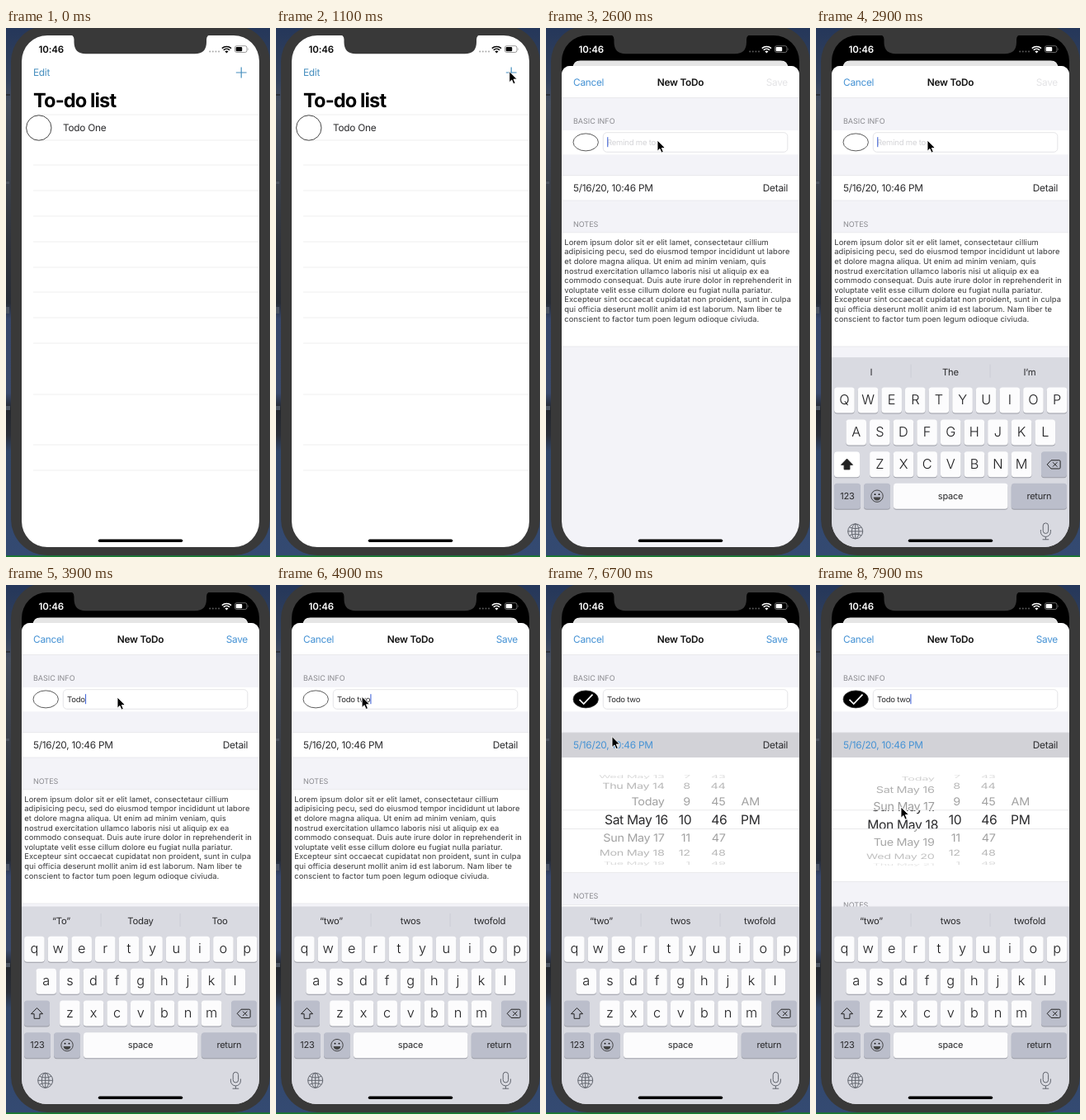
An HTML page that plays this animation: 320 by 641 pixels, repeating every 8000 ms.

```html
<!DOCTYPE html>
<html lang="en">
<head>
<meta charset="utf-8">
<title>To-do list</title>
<style>
html, body { margin: 0; width: 100%; height: 100%; overflow: hidden; background: #2c3c5c; }
svg { display: block; width: 100vw; height: 100vh; }
text { font-family: Inter, "Liberation Sans", sans-serif; white-space: pre; text-rendering: geometricPrecision; }
</style>
</head>
<body>
<svg id="stage" viewBox="0 0 320 641" xmlns="http://www.w3.org/2000/svg"></svg>
<script>
const BLUE = '#4592d4', INK = '#2a2a2c';
const $ = id => document.getElementById(id);
const clamp = v => Math.max(0, Math.min(1, v));
const mix = (a, b, p) => a + (b - a) * p;
const easeOut = p => 1 - (1 - clamp(p)) ** 3;
const smooth = p => (p = clamp(p)) * p * (3 - 2 * p);
const rgb = (a, b, p) => `rgb(${a.map((v, i) => Math.round(mix(v, b[i], p)))})`;

// y is the middle of the capitals
const text = (x, y, str, { size = 11.83, fill = INK, weight = 400, anchor = 'start', track = -.022, id = '' } = {}) =>
  `<text ${id && `id="${id}"`} x="${x}" y="${y + size * .36}" font-size="${size}" font-weight="${weight}"
   letter-spacing="${track * size}" text-anchor="${anchor}" ${fill ? `fill="${fill}"` : ''}>${str}</text>`;
const rect = (x, y, w, h, fill, more = '') =>
  `<rect x="${x}" y="${y}" width="${w}" height="${h}" fill="${fill}" ${more}/>`;
const path = (d, stroke, width, more = '') =>
  `<path d="${d}" fill="none" stroke="${stroke}" stroke-width="${width}" ${more}/>`;
const hair = (x, y, fill = '#e6e6ea') => rect(x, y - .4, 307 - x, .8, fill);

const backdrop = () => {
  const stops = ['0 #25375a', '.1 #33425c', '.14 #454e5e', '.3 #3a3f49', '.42 #2e323b', '.52 #272c36',
    '.55 #36466a', '.69 #3a4a6c', '.72 #23262c', '.77 #2a2e37', '.8 #314668', '1 #344a72'];
  return `<defs><linearGradient id="sky" x2="0" y2="1">${stops.map(s => s.split(' '))
    .map(([o, c]) => `<stop offset="${o}" stop-color="${c}"/>`).join('')}</linearGradient>
    <clipPath id="screen"><rect x="19" y="9" width="288" height="620" rx="31"/></clipPath>
    <clipPath id="slot"><rect x="19" y="273" width="288" height="22.5"/></clipPath>
    <clipPath id="offSlot"><path d="M19 209h288v64H19z M19 295.5h288v64H19z"/></clipPath>
    <clipPath id="drawer"><rect id="drawerBox" x="19" y="209" width="288" height="0"/></clipPath></defs>` +
    rect(0, 0, 320, 641, 'url(#sky)') + rect(0, 80, 5, 2, '#2c3038') + rect(0, 186, 4, 3, '#4d535f') +
    rect(0, 338, 4, 8, '#4b5362') + rect(0, 458, 5, 5, '#4d5562') +
    rect(6, -3, 314, 642, '#393939', 'rx="44"') + rect(0, 639.2, 320, 1.8, '#1a7a30');
};

const listPage = () => {
  const rows = [105, 136, 166, 197, 228, 259, 290, 320, 351, 382, 444, 505, 536];
  return `<g id="card"><path id="cardShape" fill="#fff"/>
    <g id="tint">${text(33, 54, 'Edit', { fill: '' })}
    <path d="M278.8 54h12.8M285.2 47.6v12.8" stroke-width="1.2"/></g>
    ${text(33, 87, 'To-do list', { size: 23.65, weight: 700, fill: '#000', track: -.038 })}
    ${rows.map(y => hair(33, y, '#ebebeb')).join('')}
    <circle cx="39.8" cy="121" r="15.2" fill="#fff" stroke="#333" stroke-width=".9"/>
    ${text(69, 120.8, 'Todo One')}
    <rect id="shade" x="19" y="9" width="288" height="620" rx="10" fill="#000" opacity="0"/></g>`;
};

const notes = [
  'Lorem ipsum dolor sit er elit lamet, consectetaur cillium',
  'adipisicing pecu, sed do eiusmod tempor incididunt ut labore',
  'et dolore magna aliqua. Ut enim ad minim veniam, quis',
  'nostrud exercitation ullamco laboris nisi ut aliquip ex ea',
  'commodo consequat. Duis aute irure dolor in reprehenderit in',
  'voluptate velit esse cillum dolore eu fugiat nulla pariatur.',
  'Excepteur sint occaecat cupidatat non proident, sunt in culpa',
  'qui officia deserunt mollit anim id est laborum. Nam liber te',
  'conscient to factor tum poen legum odioque civiuda.'];

const section = (y, label) => text(33, y, label, { size: 9.04, fill: '#8a8a8f', track: -.005 });

const sheet = () => `<g id="sheet">
  <path id="sheetBody" d="M19 56a10 10 0 0 1 10-10h268a10 10 0 0 1 10 10v583H19z"/>
  <path d="M19 84.5V56a10 10 0 0 1 10-10h268a10 10 0 0 1 10 10v28.5z" fill="#fff"/>${hair(19, 84.6)}
  ${text(33, 65.3, 'Cancel', { fill: BLUE })}
  ${text(163, 65.3, 'New ToDo', { weight: 600, anchor: 'middle', fill: '#111' })}
  ${text(293, 65.3, 'Save', { anchor: 'end', id: 'save' })}
  ${section(113, 'BASIC INFO')}
  ${rect(19, 124, 288, 29.3, '#fff')}
  <rect x="69.3" y="126.7" width="223.5" height="23.6" rx="4.5" fill="#fff" stroke="#dedee1" stroke-width=".8"/>
  <ellipse id="toggle" cx="48.2" cy="138.4" rx="15.2" ry="10.5" stroke="#333" stroke-width=".8"/>
  <path id="tick" d="M40.5 138.8L45.7 144L56.5 132.6" fill="none" stroke="#fff" stroke-width="1.7"/>
  ${text(74, 138.4, '', { size: 9.5, id: 'entry' })}
  <rect id="caret" y="132.2" width="1.1" height="12" fill="#4668d8"/>
  <rect id="dateRow" x="19" y="178.7" width="288" height="30.3"/>${hair(19, 178.7)}
  ${text(33, 194, '5/16/20, 10:46 PM', { id: 'date' })}
  ${text(293, 194, 'Detail', { anchor: 'end' })}
  <g clip-path="url(#drawer)">${rect(19, 209, 288, 151, '#fff')}<g id="wheels"></g></g>
  <g id="below">${hair(19, 209)}${section(237.5, 'NOTES')}
    ${rect(19, 247.8, 288, 138, '#fff')}${hair(19, 247.8)}${hair(19, 386)}
    ${notes.map((s, i) => text(22.3, 259.4 + i * 11.61, s, { size: 9.4, fill: '#38383a', track: .006 })).join('')}
  </g></g>`;

const key = (x, y, w, fill = '#fcfcfd') =>
  rect(x, y + 1, w, 31, '#9a9ca5', 'rx="3.6"') + rect(x, y, w, 31, fill, 'rx="3.6"');

const keyboard = () => {
  const GREY = '#bbbecb';
  const rows = [['qwertyuiop', 34.4, 425.8], ['asdfghjkl', 48.7, 464.8], ['zxcvbnm', 77.4, 503.6]];
  const letters = rows.map(([chars, x0, y]) => [...chars].map((c, i) => {
    const x = x0 + i * 28.63;
    return key(x - 12.3, y, 24.6) +
      text(x, y + 14.8, c, { size: 16.3, weight: 300, anchor: 'middle', fill: '#1c1c1e', track: 0 });
  }).join('')).join('');
  const label = (x, s, size = 11) => text(x, 557.5, s, { size, anchor: 'middle' });
  return `<g id="keyboard">${rect(19, 389.5, 288, 245, '#d9dae1')}
    ${[0, 1, 2].map(i => text(67 + i * 96, 407, '', { size: 11.3, anchor: 'middle', id: 'hint' + i })).join('')}
    ${rect(114.7, 398, .7, 16, '#c6c8cf')}${rect(210.7, 398, .7, 16, '#c6c8cf')}
    <g id="letters">${letters}</g>
    ${key(22, 503.6, 31, GREY)}<rect id="shiftOn" x="22" y="503.6" width="31" height="31" rx="3.6" fill="#fff"/>
    <path id="shift" d="M37.5 512.5l7 7.2h-3.6v5.6h-6.8v-5.6h-3.6z" stroke="#222" stroke-width="1" stroke-linejoin="round"/>
    ${key(273, 503.6, 31, GREY)}
    ${path('M285 514.2h9.8q1.3 0 1.3 1.3v7.6q0 1.3-1.3 1.3h-9.8l-4.8-5.1zM287 516.6l5.4 5.4M292.4 516.6l-5.4 5.4', '#222', 1)}
    ${key(22, 542.2, 32, GREY)}${label(38, '123')}
    ${key(58, 542.2, 32, GREY)}<circle cx="74" cy="557.6" r="7.2" fill="none" stroke="#333" stroke-width=".9"/>
    <circle cx="71.5" cy="555.6" r=".9"/><circle cx="76.5" cy="555.6" r=".9"/>
    <path d="M69.6 559h8.8q-.6 4-4.4 4t-4.4-4z" fill="#444"/>
    ${key(94, 542.2, 138.5)}${label(163, 'space')}
    ${key(236.8, 542.2, 67.2, GREY)}${label(270.4, 'return')}
    <g fill="none" stroke="#60646d" stroke-width="1"><circle cx="47.7" cy="600.3" r="9"/>
    <ellipse cx="47.7" cy="600.3" rx="4.3" ry="9"/>
    <path d="M38.7 600.3h18M47.7 591.3v18M40.5 595.3q7.2 3.4 14.4 0M40.5 605.3q7.2-3.4 14.4 0"/>
    <rect x="275.2" y="590.3" width="6.4" height="12.6" rx="3.2"/>
    <path d="M272.4 598.5v2.4a6 6 0 0 0 12 0v-2.4M278.4 607v3.2M274.6 610.2h7.6"/></g></g>`;
};

const statusBar = () => `<g id="status">
  ${text(54.8, 25.6, '10:46', { size: 11.5, weight: 600, anchor: 'middle', fill: '', track: -.012 })}
  <g opacity=".35">${[247.2, 250.8, 254.4, 258].map(x => `<circle cx="${x}" cy="28.6" r="1"/>`).join('')}</g>
  <path d="M267.4 30.6l-2.1-2.3a3.2 3.2 0 0 1 4.2 0z"/>
  <g fill="none" stroke-width="1.5" class="lines"><path d="M263.7 26.7a5.4 5.4 0 0 1 7.4 0M261.8 24.6a8.2 8.2 0 0 1 11.2 0"/>
  <rect x="277.4" y="21.7" width="14.6" height="7.8" rx="2.2" stroke-width=".8" opacity=".5"/></g>
  <rect x="278.6" y="22.9" width="7.6" height="5.4" rx="1.1"/>
  <path d="M293 24.2q1.3 1.4 0 2.8z" opacity=".5"/></g>`;

$('stage').innerHTML = backdrop() +
  `<g clip-path="url(#screen)">${rect(19, 9, 288, 620, '#000')}${listPage()}${statusBar()}${sheet()}${keyboard()}
  ${rect(111.8, 619.6, 102.4, 3.4, '#000', 'rx="1.7"')}</g>
  <path d="M76 8q6.5 0 6.5 6v3q0 14.2 14 14.2h132.5q14 0 14-14.2v-3q0-6 6.5-6z" fill="#393939"/>
  <path id="cursor" d="M0 0v13.2l3-2.8 2 4.8 2.3-1-2-4.7h4.2z" fill="#000" stroke="#fff" stroke-width=".9"/>`;

const dayNames = ['Sat', 'Sun', 'Mon', 'Tue', 'Wed', 'Thu', 'Fri'];
const wrap = (n, m) => ((n % m) + m) % m;
const columns = [
  { x: 148, inset: -4.5, anchor: 'end', label: i => i === -1 ? 'Today' : `${dayNames[wrap(i, 7)]} May ${16 + i}` },
  { x: 176.3, inset: -1.5, anchor: 'end', label: i => wrap(9 + i, 12) + 1 },
  { x: 219.5, inset: -2, anchor: 'end', label: i => 46 + i },
  { x: 236, inset: .6, anchor: 'start', label: i => ['AM', 'PM'][i + 1] }];

function wheels(dayPos) {
  let inner = '', outer = '';
  columns.forEach(({ x, inset, anchor, label }, c) => {
    const pos = c ? 0 : dayPos;
    for (let i = Math.ceil(pos - 3.4); i <= pos + 3.4; i++) {
      const str = label(i), turn = (i - pos) * .4, flat = Math.cos(turn);
      if (str === undefined) continue;
      if (Math.abs(i - pos) < 1.2)
        inner += text(x, 284.2 + (i - pos) * 22.3, str, { size: 15.7, anchor });
      outer += `<g transform="translate(${x + inset} ${284.2 + 56.3 * Math.sin(turn)}) scale(1 ${flat})"
        opacity="${.4 * flat}">${text(0, 0, str, { size: 14.4, anchor, fill: '#000' })}</g>`;
    }
  });
  return `<g clip-path="url(#offSlot)">${outer}</g><g clip-path="url(#slot)">${inner}</g>` +
    hair(19, 272.8, '#e4e4e6') + hair(19, 295.6, '#e4e4e6');
}

const moves = [[500, 332, 210], [1150, 282, 50], [1400, 282, 50], [1700, 184, 95], [2250, 135, 136], [4700, 135, 136],
  [5200, 48, 134], [5500, 48, 134], [6000, 72, 173.5], [6300, 80, 183.5], [6750, 80, 183.5],
  [7250, 103, 306], [7350, 103, 306], [7900, 103, 269], [8000, 103, 265]];

function cursorAt(t) {
  const n = moves.findIndex(m => m[0] > t);
  if (n < 1) return [340, 210];
  const [a, b] = [moves[n - 1], moves[n]], p = smooth((t - a[0]) / (b[0] - a[0]));
  return [mix(a[1], b[1], p), mix(a[2], b[2], p)];
}

const keyTimes = [3150, 3400, 3600, 3800, 4050, 4200, 4350, 4500];
const hintsFor = n => n < 1 ? ['I', 'The', 'I’m'] : n < 6 ? ['“To”', 'Today', 'Too'] : ['“two”', 'twos', 'twofold'];
const set = (id, attrs) => { for (const k in attrs) $(id).setAttribute(k, attrs[k]); };
const show = (id, on) => { $(id).style.display = on ? '' : 'none'; };

function draw(t) {
  const rise = easeOut((t - 1400) / 600), scale = mix(1, .905, rise), round = 10 * clamp(rise * 3);
  set('card', { transform: `translate(${163 * (1 - scale)} ${mix(9, 39.6, rise) - 9 * scale}) scale(${scale})` });
  set('cardShape', { d: `M19 629V${9 + round}q0 ${-round} ${round} ${-round}h${288 - 2 * round}q${round} 0 ${round} ${round}V629z` });
  set('shade', { opacity: .1 * rise, rx: round });
  const tint = rgb([70, 142, 190], [150, 150, 150], rise);
  set('tint', { fill: tint, stroke: 'none', opacity: t > 1250 && t < 1400 ? .7 : 1 });
  $('tint').querySelector('path').setAttribute('stroke', tint);
  const status = rgb([10, 10, 10], [255, 255, 255], smooth((t - 1520) / 330));
  set('status', { fill: status });
  $('status').querySelector('.lines').setAttribute('stroke', status);

  show('sheet', rise > 0);
  set('sheet', { transform: `translate(0 ${595 * (1 - rise)})` });
  set('sheetBody', { fill: rgb([252, 252, 253], [243, 243, 248], clamp((t - 1700) / 300)) });

  const typed = keyTimes.filter(k => t >= k).length;
  const up = easeOut((t - 2650) / 380);
  set('keyboard', { transform: `translate(0 ${245 * (1 - up)})` });
  set('save', { fill: typed ? BLUE : '#e4e4e6' });
  hintsFor(typed).forEach((s, i) => $('hint' + i).textContent = s);
  $('letters').style.textTransform = typed ? 'none' : 'uppercase';
  show('shiftOn', !typed);
  set('shift', { fill: typed ? 'none' : '#222' });
  $('entry').textContent = typed ? 'Todo two'.slice(0, typed) : 'Remind me to...';
  set('entry', { fill: typed ? INK : '#d3d3d6' });
  const blink = wrap(t, 1000), typing = t < 4900;
  set('caret', { x: 74.2 + (typed ? $('entry').getComputedTextLength() : 0) });
  show('caret', t >= 2500 && (typing || blink < 450 || blink >= 800));

  const checked = t >= 5350;
  set('toggle', { fill: checked ? '#000' : '#fff' });
  show('tick', checked);

  const picked = t >= 6400, open = 150.3 * easeOut((t - 6420) / 480);
  set('dateRow', { fill: picked ? '#d2d2d7' : '#fff' });
  set('date', { fill: picked ? BLUE : INK });
  set('drawerBox', { height: open });
  set('below', { transform: `translate(0 ${open})` });
  $('wheels').innerHTML = picked ? wheels(1.72 * smooth((t - 7350) / 550)) : '';

  set('cursor', { transform: `translate(${cursorAt(t)})` });
}

const start = performance.now();
function tick() {
  draw((performance.now() - start) % 8000);
  requestAnimationFrame(tick);
}
draw(0);
tick();
</script>
</body>
</html>
```
